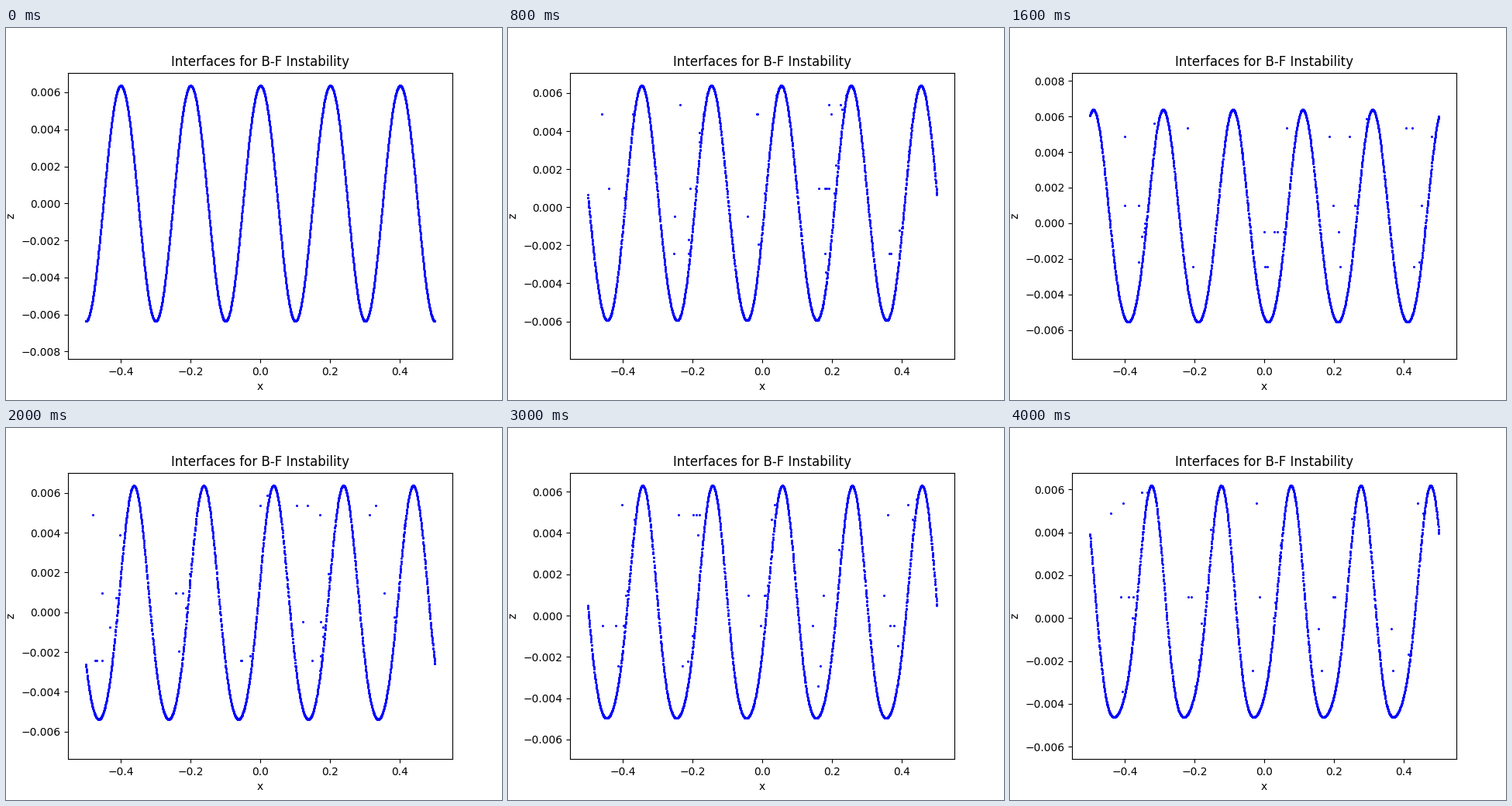
These frames come from a looping animation (640 px wide and 480 px high, 4.1 s). A matplotlib script:

```python
import numpy as np
import matplotlib.pyplot as plt
from matplotlib.animation import FuncAnimation

FRAMES, INTERVAL = 41, 100
LENGTH = 0.2                    # wavelength
K = 2 * np.pi / LENGTH
SPEED = 0.1819                  # distance travelled per frame
CELL = 1 / 2048                 # grid on which stray points sit
PAD = 0.00135                   # room left for the markers
SHELVES = np.array([-5, -1, 2, 10, 11]) * CELL


class Wave:
    """A decaying, steepening wave train with a free second harmonic."""

    def __init__(self, n):
        beat = -0.00037 * np.exp(-n / 20) * np.cos((np.pi + 0.05) * n)
        lag = beat * (1 - np.exp(-n / 2))
        self.amp = 0.00636 - 0.0000245 * n
        self.second = 0.00037 + 0.00001 * n + beat
        self.skew = 0.4 * lag + 0.0002 * (n / (FRAMES - 1)) ** 2
        self.shift = 2 * self.skew / (self.amp + 4 * self.second)
        crest = SPEED * n + 6 * lag
        self.first = -0.5 + (crest + 0.5) % LENGTH

    def profile(self, theta):
        t = theta + self.shift
        return (self.amp * np.cos(t) + self.second * np.cos(2 * t)
                + self.skew * np.sin(2 * t))

    def height(self, x):
        return self.profile(K * (x - self.first))


def strays(n, wave, rng):
    """Loose points in the hollows, many of them close to the rising faces."""
    count = round(46 * min(n / 4, 1))
    near = rng.random(count) < 0.5
    z = np.where(near, rng.integers(-14, 25, count) * CELL / 2,
                 rng.choice(SHELVES, count))
    theta = np.linspace(-np.pi + 0.15, 0, 200)
    face = np.interp(z, wave.profile(theta), theta)
    hollow = 2 * (np.pi + face) / K
    gap = np.where(near, rng.exponential(0.005, count),
                   rng.uniform(0.08, 0.7, count) * hollow)
    x = wave.first + LENGTH * rng.integers(0, 6, count) + face / K - gap
    return np.column_stack([x, z])[np.abs(x) <= 0.5]


def limits(wave, z):
    low, top = z.min() - PAD, z.max()
    if wave.first < -0.402:     # a crest close to the left end needs room
        top += PAD
    margin = 0.05 * (top - low)
    return low - margin, top + margin


plt.rcParams["text.kerning_factor"] = 6
fig, ax = plt.subplots(figsize=(6.4, 4.8), dpi=100)
dots = ax.scatter([], [], s=0.5, color="blue", linewidths=1.5)
ax.set_title("Interfaces for B-F Instability")
ax.set_xlabel("x")
ax.set_ylabel("z")
ax.set_xlim(-0.551, 0.55)


def update(n):
    rng = np.random.default_rng(n)
    wave = Wave(n)
    x = np.linspace(-0.5, 0.5, 2049)
    if n:
        x = np.clip(x + rng.uniform(-0.6, 0.6, x.size) * CELL, -0.5, 0.5)
    z = wave.height(x)
    dots.set_offsets(np.vstack([np.column_stack([x, z]),
                                strays(n, wave, rng)]))
    ax.set_ylim(*limits(wave, z))
    return (dots,)


anim = FuncAnimation(fig, update, frames=FRAMES, interval=INTERVAL,
                     repeat=True, repeat_delay=0, blit=False)
plt.show()
```
